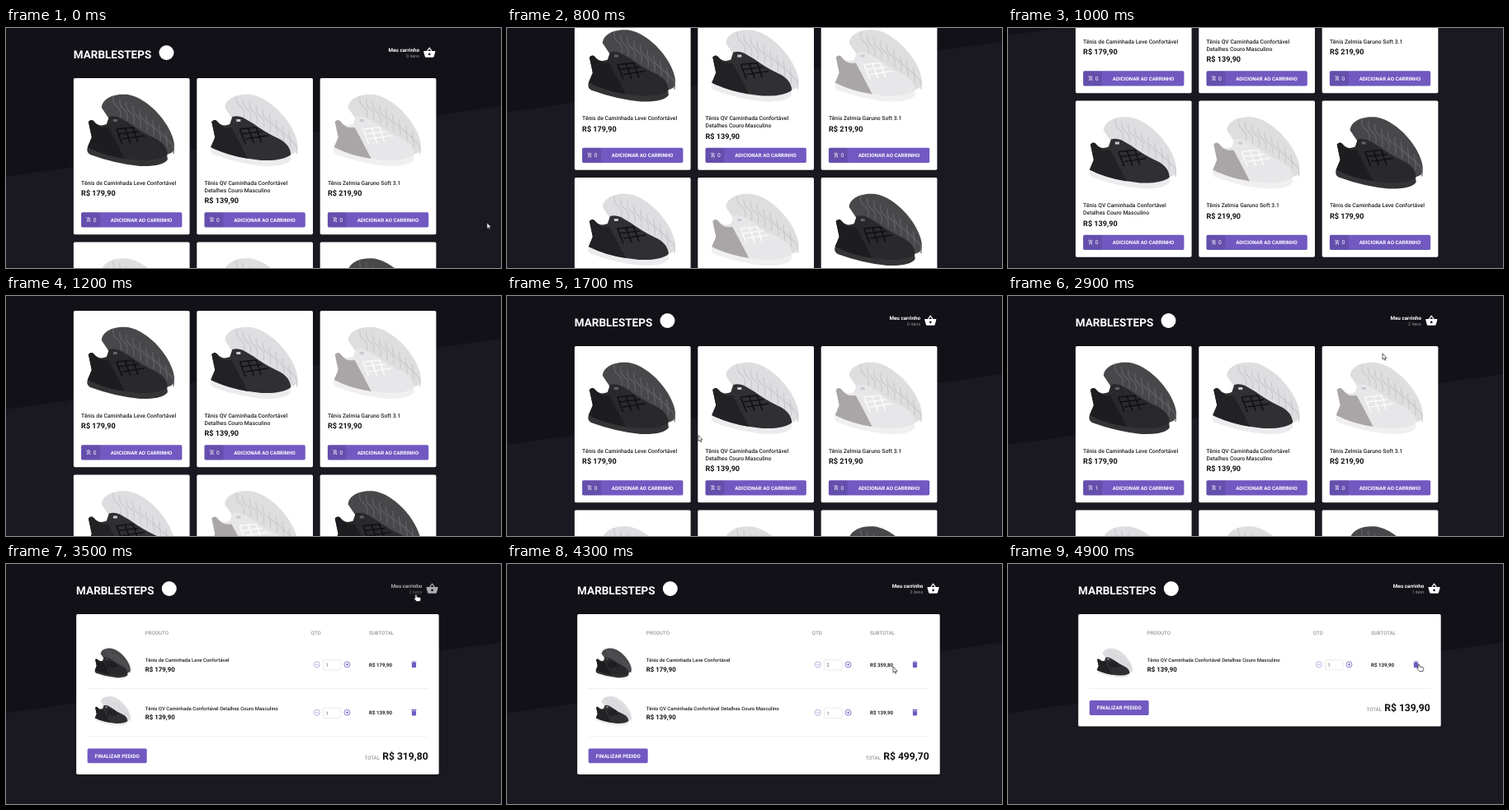
Write an HTML page that moves like this. It is 600x292 px and loops after 5 s.

```html
<!DOCTYPE html>
<html lang="pt-BR">
<head>
<meta charset="utf-8">
<title>Loja de tênis</title>
<style>
  html, body { margin: 0; width: 100%; height: 100%; overflow: hidden; background: #1a1820; }
  svg { display: block; }
  text { font-family: Roboto, "Open Sans", sans-serif; text-rendering: geometricPrecision; white-space: pre; }
</style>
</head>
<body>
<svg id="stage" width="600" height="292" viewBox="0 0 600 292">
  <defs>
    <path id="basket" d="M17.2 9 12.8 2.4Q12 1.6 11.2 2.4L6.8 9H2Q.8 9 1 10.3L3.6 19.5Q4 21 5.5 21H18.500Q20 21 20.400 19.500L23 10.300Q23.200 9 22 9ZM9 9 12 4.600 15 9ZM12 17a2 2 0 1 1 0-4 2 2 0 0 1 0 4Z"/>
    <g id="addCart">
      <path d="M1 3H4L8 12H16L20 4.500M8 12 6 16H19M12 1V9M8 5H16" fill="none" stroke="#fff" stroke-width="2"/>
      <circle cx="7" cy="20" r="2" fill="#fff"/><circle cx="17" cy="20" r="2" fill="#fff"/>
    </g>
    <path id="trash" d="M6 19Q6 21 8 21H16Q18 21 18 19V7H6ZM19 4H15.500L14.500 3H9.500L8.500 4H5V6H19Z"/>
    <path id="arrow" d="M0 0V7.200L1.700 5.700 2.800 8.200 3.900 7.700 2.800 5.300H5Z"/>
    <path id="hand" d="M-1 .5Q0-.5 .9 .5V3L5 3.800Q6 4 5.800 5.500L5 8.500H.6L-2.300 5.200Q-2.300 4-1 4.800Z"/>
  </defs>
</svg>
<script>
const stage = document.getElementById('stage');
const LOOP = 5000, STEP = 100, ROW = 58.4;
const PURPLE = '#7159c1', DARK = '#5b43ab';

const products = [
  { lines: ['Tênis de Caminhada Leve Confortável'], price: 179.9 },
  { lines: ['Tênis QV Caminhada Confortável', 'Detalhes Couro Masculino'], price: 139.9 },
  { lines: ['Tênis Zelmia Garuno Soft 3.1'], price: 219.9 }
];
const looks = [
  { back: '#48484b', rib: '#626266', upper: '#29292c', heel: '#1d1d20', sole: '#343437', lace: '#101012' },
  { back: '#dedee1', rib: '#c9c9ce', upper: '#303033', heel: '#222225', sole: '#ececee', lace: '#111113' },
  { back: '#dededf', rib: '#cacacd', upper: '#e7e6e8', heel: '#aaa6a7', sole: '#f0f0f1', lace: '#fafafa' }
];

// time, x, y, shape: 0 hidden, 1 arrow, 2 hand
const pointer = [
  [0, 583, 237, 1], [100, 560, 214, 1], [200, 470, 165, 1], [300, 330, 126, 1],
  [400, 190, 109, 1], [500, 101, 105, 1], [700, 101, 105, 0], [1600, 262, 150, 1],
  [1700, 232, 169.500, 1], [1800, 190, 198, 1], [1900, 152, 231, 2], [2100, 152, 231, 2],
  [2300, 262, 232, 2], [2400, 290, 232, 2], [2600, 296, 230, 2], [2700, 345, 185, 1],
  [2800, 405, 122, 1], [2900, 454, 70, 1], [3000, 496, 42, 1], [3100, 497, 37, 2],
  [3600, 497, 37, 2], [3700, 478, 66, 1], [3800, 434, 108, 1], [3900, 414, 122, 2],
  [4100, 414, 122, 2], [4200, 453, 126, 1], [4300, 468, 125, 1], [4400, 484, 122, 1],
  [4500, 498, 122, 2], [5000, 498, 122, 2]
];
const scrolls = [[600, 0], [700, 24], [800, 78.500], [900, 148], [1000, 172], [1100, 116], [1200, 43], [1300, 0]];

function sample(table, t) {
  let i = table.findIndex(k => k[0] > t);
  if (i === 0) return table[0];
  if (i < 0) return table[table.length - 1];
  const a = table[i - 1], b = table[i], p = (t - a[0]) / (b[0] - a[0]);
  return a.map((v, n) => v + (b[n] - v) * p);
}

const money = n => 'R$ ' + n.toFixed(2).replace('.', ',');

function text(x, y, size, str, { weight = 400, fill = '#222', anchor = 'start', id = '' } = {}) {
  return `<text x="${x}" y="${y}" font-size="${size}" font-weight="${weight}" fill="${fill}" text-anchor="${anchor}"${id && ` id="${id}"`}>${str}</text>`;
}

function rect(x, y, w, h, fill, extra = '') {
  return `<rect x="${x}" y="${y}" width="${w}" height="${h}" fill="${fill}" ${extra}/>`;
}

function shoe(kind) {
  const c = looks[kind];
  let ribs = '';
  for (let i = 0; i < 9; i++) {
    const x = 48 + i * 8, y = 22 + i * i * 0.35 + i * 2.600;
    ribs += `M${x} ${y}q-1 9 5 13t4 14`;
  }
  return `<path d="M34 36C34 25 49 18 66 20C93 25 119 58 122 80C123 91 117 94 106 92L50 60Z" fill="${c.back}"/>
    <path d="${ribs}" fill="none" stroke="${c.rib}" stroke-width="1.200"/>
    <path d="M17 84Q15 90 20 93Q50 104 80 107Q108 108 114 99L113 91 60 88Z" fill="${c.sole}"/>
    <path d="M18 53Q22 49 25 53Q31 60 40 56L43 47Q49 45 56 48L68 55Q83 66 98 73Q113 80 114 93Q105 101 78 100Q46 97 17 84L22 72Z" fill="${c.upper}"/>
    <path d="M18 53Q22 49 25 53Q31 62 42 60L49 73 62 98Q36 94 17 84L22 72Z" fill="${c.heel}"/>
    <path d="M52 62 72 60M54 68 79 65M59 74 86 70M52 62 59 80M62 60 69 79M72 60 78 78" fill="none" stroke="${c.lace}" stroke-width="1.700"/>
    <rect x="48" y="50" width="5" height="3" fill="${c.rib}"/>`;
}

function header(key) {
  return text(81.800, 37, 13.500, 'MARBLESTEPS', { weight: 700, fill: '#fff' }) +
    `<circle cx="194.500" cy="30" r="9" fill="#fff"/>
    <g id="${key}Link">` +
    text(501, 29, 6.300, 'Meu carrinho', { weight: 700, fill: '#fff', anchor: 'end' }) +
    text(501, 36.200, 5.350, '', { fill: '#999', anchor: 'end', id: key + 'Items' }) +
    `<use href="#basket" transform="translate(505.500 22.200) scale(.647)" fill="#fff"/></g>`;
}

const backdrop = rect(-10, -10, 620, 700, '#1a1820') +
  '<path d="M-10-10H610V93.500L-10 182.500Z" fill="#131118"/>';

function card(i) {
  const kind = i < 3 ? i : (i - 2) % 3, p = products[kind];
  const x = 81.900 + (i % 3) * 149.400, y = 61 + Math.floor(i / 3) * 199.500;
  const titles = p.lines.map((s, n) => text(9.200, 129.800 + n * 9, 6.800, s, { weight: 500 })).join('');
  return `<g transform="translate(${x} ${y})">` +
    rect(0, 0, 140.700, 190.300, '#fff', 'rx="1.700"') + shoe(kind) + titles +
    text(9.200, 134.300 + p.lines.length * 9, 9.100, money(p.price), { weight: 700, fill: '#111' }) +
    rect(9.200, 163.300, 122.300, 18.200, PURPLE, `rx="1.700" id="buy${i}"`) +
    rect(9.200, 163.300, 23, 18.200, '#000', 'opacity=".1" rx="1.700"') +
    '<use href="#addCart" transform="translate(15 168.800) scale(.28)"/>' +
    text(23.800, 174.800, 6.700, '0', { fill: '#fff', id: 'count' + i }) +
    text(82.200, 174.500, 6.150, 'ADICIONAR AO CARRINHO', { weight: 700, fill: '#fff', anchor: 'middle' }) +
    '</g>';
}

function cartRow(i) {
  const p = products[i];
  const ring = (x, d, o) => `<path d="M${x - 3.500} 122.300a3.500 3.500 0 1 1 7 0a3.500 3.500 0 1 1-7 0M${x - 1.800} 122.300h3.600${d}" fill="none" stroke="${PURPLE}" stroke-width=".8" opacity="${o}"/>`;
  return `<g id="row${i}"><g transform="translate(100.800 94.500) scale(.41)">${shoe(i)}</g>` +
    text(168.800, 119.200, 6, p.lines.join(' '), { weight: 500 }) +
    text(168.800, 130.600, 7.850, money(p.price), { weight: 700, fill: '#111' }) +
    ring(376.800, '', .6) + ring(413.500, 'm-1.800-1.800v3.600', 1) +
    rect(384.500, 116.700, 21.500, 12.300, '#fff', 'rx="1.700" stroke="#ddd" stroke-width=".6"') +
    text(387.300, 125.200, 6.200, '1', { fill: '#666', id: 'qty' + i }) +
    text(440, 124.900, 6.150, money(p.price), { weight: 700, id: 'sub' + i }) +
    `<use href="#trash" transform="translate(489.300 117) scale(.431)" fill="${PURPLE}"/>` +
    rect(98.700, 151.200, 413, .6, '#e6e6e6') + '</g>';
}

const th = (x, s) => text(x, 86.400, 6.200, s, { weight: 500, fill: '#999' });

stage.insertAdjacentHTML('beforeend',
  `<g id="shop">${backdrop}${header('shop')}${[0, 1, 2, 3, 4, 5].map(card).join('')}</g>
  <g id="cart"><g transform="translate(3.300 0)">${backdrop}${header('cart')}</g>` +
  rect(85.200, 61, 439.500, 195, '#fff', 'rx="1.700" id="panel"') +
  th(168.800, 'PRODUTO') + th(369.800, 'QTD') + th(440, 'SUBTOTAL') + cartRow(0) + cartRow(1) +
  '<g id="foot">' + rect(98.700, 224.500, 72, 17.800, PURPLE, 'rx="1.700"') +
  text(134.800, 235.600, 6.200, 'FINALIZAR PEDIDO', { weight: 700, fill: '#fff', anchor: 'middle' }) +
  text(434.500, 237.800, 6.200, 'TOTAL', { weight: 500, fill: '#999' }) +
  text(511.700, 237.800, 12.150, '', { weight: 700, fill: '#111', anchor: 'end', id: 'total' }) +
  '</g></g><use id="cursor" fill="#fff" stroke="#222" stroke-width=".7"/>');

const el = id => document.getElementById(id);
const set = (id, name, value) => el(id).setAttribute(name, value);
const write = (id, s) => { if (el(id).textContent !== s) el(id).textContent = s; };
const within = (t, a, b) => t >= a && t < b;

function draw(t) {
  const inCart = t >= 3300, removed = t >= 4900;
  const added = [t >= 2000, t >= 2500];
  const items = removed ? 1 : added[0] + added[1];
  const label = items + (items === 1 ? ' item' : ' itens');
  const dim = within(t, 3100, 3700) ? .65 : 1;

  set('shop', 'display', inCart ? 'none' : 'inline');
  set('cart', 'display', inCart ? 'inline' : 'none');
  set('shop', 'transform', `translate(0 ${-sample(scrolls, t)[1]})`);
  for (const key of ['shop', 'cart']) {
    write(key + 'Items', label);
    set(key + 'Link', 'opacity', dim);
  }
  added.forEach((on, i) => write('count' + i, on ? '1' : '0'));
  set('buy0', 'fill', within(t, 1900, 2200) ? DARK : PURPLE);
  set('buy1', 'fill', within(t, 2300, 2700) ? DARK : PURPLE);

  const qty = t >= 4000 ? 2 : 1;
  const first = removed ? 0 : qty * products[0].price;
  const lift = removed ? -ROW : 0;
  write('qty0', String(qty));
  write('sub0', money(qty * products[0].price));
  write('total', money(first + products[1].price));
  set('row0', 'display', removed ? 'none' : 'inline');
  set('row1', 'transform', `translate(0 ${ROW + lift})`);
  set('foot', 'transform', `translate(0 ${lift})`);
  set('panel', 'height', 195 + lift);

  const [, x, y, shape] = sample(pointer, t);
  const kind = Math.floor(shape);
  set('cursor', 'display', kind ? 'inline' : 'none');
  set('cursor', 'href', kind === 2 ? '#hand' : '#arrow');
  set('cursor', 'transform', `translate(${x} ${y})`);
}

function tick() {
  draw(Math.floor(performance.now() % LOOP / STEP) * STEP);
  requestAnimationFrame(tick);
}
tick();
</script>
</body>
</html>
```
